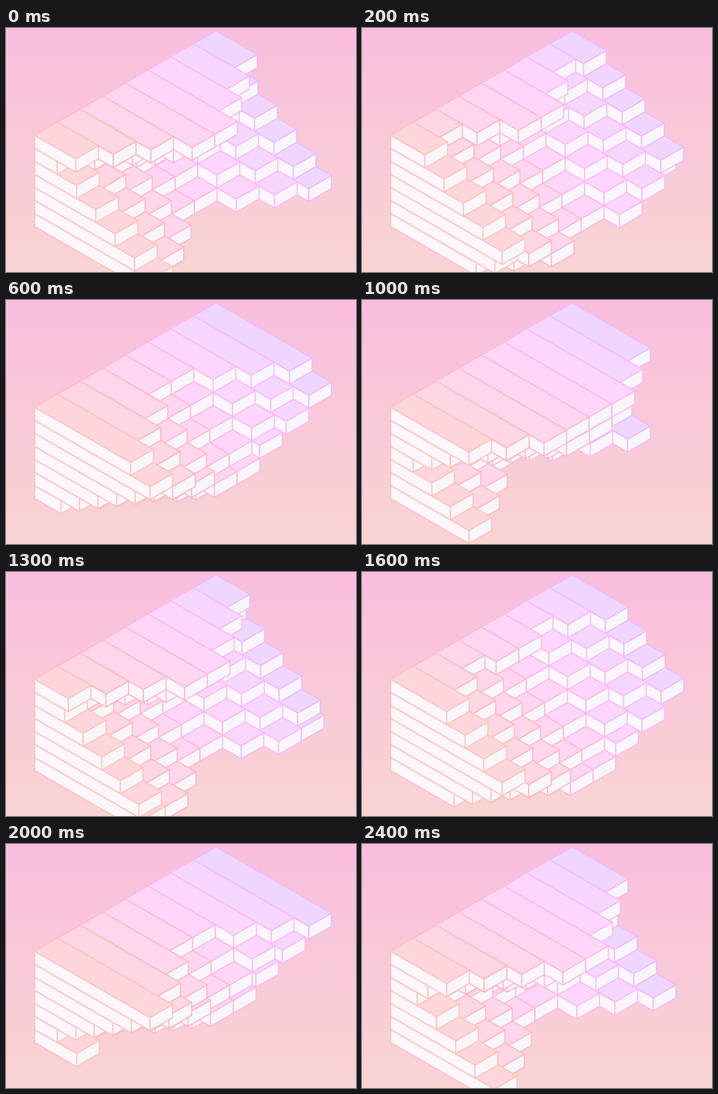
Write an HTML page that moves like this. It is 500 px wide and 350 px high and loops after 2.5 s.

```html
<!DOCTYPE html>
<html lang="en">
<head>
<meta charset="utf-8">
<title>Isometric bars</title>
<style>
  html, body { margin: 0; width: 100%; height: 100%; overflow: hidden; }
  body { background: linear-gradient(#f9bedd, #f8d4d3); }
  svg { display: block; width: 500px; height: 350px; }
</style>
</head>
<body>
<svg id="stage" viewBox="0 0 500 350" stroke-width="1.7" stroke-linejoin="round"></svg>
<script>
const COLS = 8, ROWS = 7;
const LOOP = 2500, STEP = 100;
const UNIT = 32.4, SLOPE = Math.tan(Math.PI / 6), RISE = UNIT * SLOPE;
const LEFT = { x: 41, y: 153.8 };
const MIN_LENGTH = 32.2, TRAVEL = 132.5;
const ROW_LEAD = 125;
const COL_DELAY = [0, 100, 200, 325]; // from the outer columns to the middle

// Two bounces per loop; the first pauses briefly when fully extended.
const KEYFRAMES = [[0, 0], [600, 1], [625, 1], [1250, 0], [1875, 1], [2500, 0]];

const stage = document.getElementById('stage');

function addPath(fill, stroke) {
  const path = document.createElementNS('http://www.w3.org/2000/svg', 'path');
  path.setAttribute('fill', fill);
  path.setAttribute('stroke', stroke);
  stage.append(path);
  return path;
}

// Painted far to near, and bottom to top within a column.
const bars = [];
for (let col = COLS - 1; col >= 0; col--) {
  const mix = col / (COLS - 1);
  const fill = `hsl(${352 - 77 * mix} 100% 92%)`;
  const stroke = `hsl(${370 - 82 * mix} 92% 86%)`;
  for (let row = ROWS - 1; row >= 0; row--) {
    bars.push({
      x: LEFT.x + col * UNIT,
      y: LEFT.y + (row - col) * RISE,
      lead: (row - 1) * ROW_LEAD - COL_DELAY[Math.min(col, COLS - 1 - col)],
      side: addPath('#fdf7fd', stroke),
      end: addPath('#f8f6fb', stroke),
      top: addPath(fill, stroke)
    });
  }
}

function extension(time) {
  const t = (time + LOOP) % LOOP;
  const next = KEYFRAMES.findIndex(([at]) => at > t);
  const [t0, v0] = KEYFRAMES[next - 1], [t1, v1] = KEYFRAMES[next];
  return v0 + (v1 - v0) * (t - t0) / (t1 - t0);
}

function drawBar(bar, time) {
  const length = MIN_LENGTH + TRAVEL * extension(time + bar.lead);
  const along = `${length} ${length * SLOPE}`;
  const back = `${-length} ${-length * SLOPE}`;
  const across = `${UNIT} ${-RISE}`;
  const tip = `${bar.x + length} ${bar.y + length * SLOPE}`;
  bar.side.setAttribute('d', `M${bar.x} ${bar.y}l${along}v${RISE}l${back}z`);
  bar.end.setAttribute('d', `M${tip}l${across}v${RISE}l${-UNIT} ${RISE}z`);
  bar.top.setAttribute('d', `M${bar.x} ${bar.y}l${along}l${across}l${back}z`);
}

let shown = -1;
function render(now) {
  const time = Math.floor((now % LOOP) / STEP) * STEP;
  if (time !== shown) {
    bars.forEach(bar => drawBar(bar, time));
    shown = time;
  }
}

const begin = performance.now();
function tick() {
  render(performance.now() - begin);
  requestAnimationFrame(tick);
}
tick();
</script>
</body>
</html>
```
